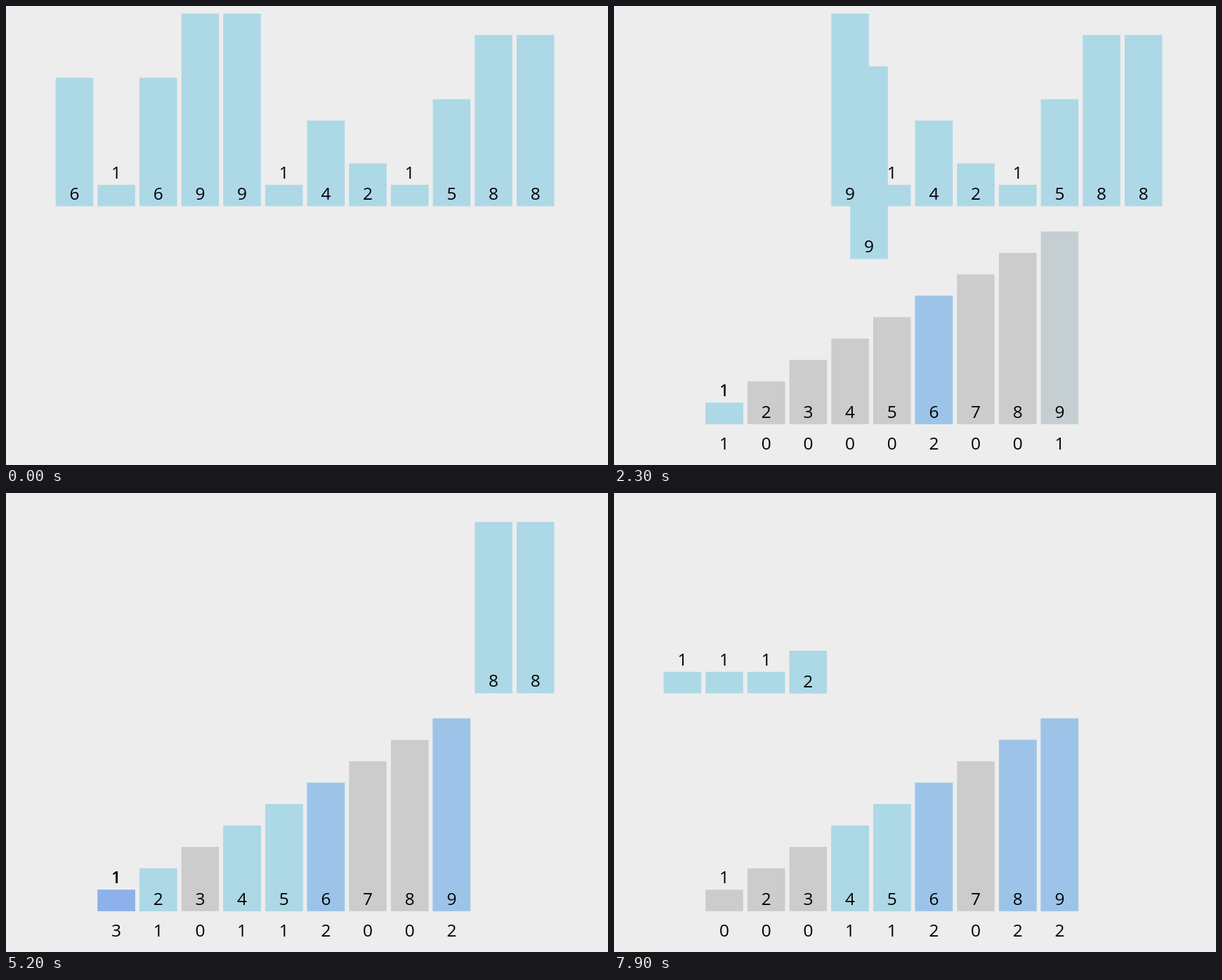
Animation of 857 by 654 pixels, one loop 8 s. Source, as an HTML page with a canvas:

```html
<!DOCTYPE html>
<html lang="en">
<head>
<meta charset="utf-8">
<title>Counting sort</title>
<style>
html, body { margin: 0; width: 100%; height: 100%; overflow: hidden; background: #ededed; }
canvas { display: block; }
</style>
</head>
<body>
<canvas id="stage" width="857" height="654"></canvas>
<script>
const ctx = document.getElementById('stage').getContext('2d');

const LOOP = 8000, TICK = 100, MOVE = 214, FADE_START = 430;
const LEFT = 70.7, PITCH = 59.66, BAR = 53.5, UNIT = 30.5;
const TOP_BASE = 285.3, COUNT_BASE = 595.8;
const GREY = [204, 204, 204], LIGHT = [173, 216, 230], BLUE = [0, 0, 255];

const values = [6, 1, 6, 9, 9, 1, 4, 2, 1, 5, 8, 8];
const picks = [1, 5, 8, 7];   // items taken back out, in sorted order
const starts = [846, 1302, 1757, 2216, 2687, 3130, 3589, 4059, 4502, 4958,
                5430, 5873, 6330, 6803, 7245, 7702];

const moves = starts.map((start, k) => {
  const out = k >= values.length;
  const item = out ? picks[k - values.length] : k;
  return { start, item, value: values[item], step: out ? -1 : 1,
           slot: out ? k - values.length : values[k],
           base: out ? TOP_BASE : COUNT_BASE };
});

const lerp = (a, b, p) => a + (b - a) * p;
const mix = (a, b, p) => a.map((v, i) => lerp(v, b[i], p));
const slotX = i => LEFT + PITCH * i;
const rgb = c => `rgb(${c.map(Math.round).join(',')})`;
const shade = n => n ? mix(LIGHT, BLUE, (n - 1) / 11) : GREY;

function progress(t, start) {
  const p = Math.min(1, Math.max(0, (t - start) / MOVE));
  return p < 0.5 ? 4 * p ** 3 : 1 - 4 * (1 - p) ** 3;
}

function label(text, x, y) {
  ctx.fillStyle = '#000';
  ctx.fillText(text, x + BAR / 2, y);
}

function bar(value, x, base, color) {
  const h = value * UNIT;
  ctx.fillStyle = rgb(color);
  ctx.fillRect(x, base - h, BAR, h);
  label(value, x, base - 9.3 - (value === 1 ? UNIT : 0));
}

function draw(t) {
  ctx.fillStyle = '#ededed';
  ctx.fillRect(0, 0, 857, 654);
  ctx.font = '24.5px "Open Sans", "Noto Sans", sans-serif';
  ctx.textAlign = 'center';

  const items = values.map((value, i) => ({ value, x: slotX(i), y: TOP_BASE }));
  const counts = Array(10).fill(0);
  const colors = Array(10).fill(GREY);

  for (const m of moves) {
    if (t < m.start - 10) break;   // the counter changes just before the bar leaves
    const p = progress(t, m.start);
    const it = items[m.item];
    it.x = lerp(it.x, slotX(m.slot), p);
    it.y = lerp(it.y, m.base, p);
    const from = shade(counts[m.value]);
    counts[m.value] += m.step;
    colors[m.value] = mix(from, shade(counts[m.value]), p);
  }

  for (const it of items) bar(it.value, it.x, it.y, LIGHT);

  ctx.globalAlpha = progress(t, FADE_START);
  for (let v = 1; v <= 9; v++) {
    bar(v, slotX(v), COUNT_BASE, colors[v]);
    label(counts[v], slotX(v), 632.2);
  }
  ctx.globalAlpha = 1;
}

const begin = performance.now();
function frame() {
  const t = (performance.now() - begin) % LOOP;
  draw(Math.floor(t / TICK) * TICK);
  requestAnimationFrame(frame);
}
frame();
</script>
</body>
</html>
```
